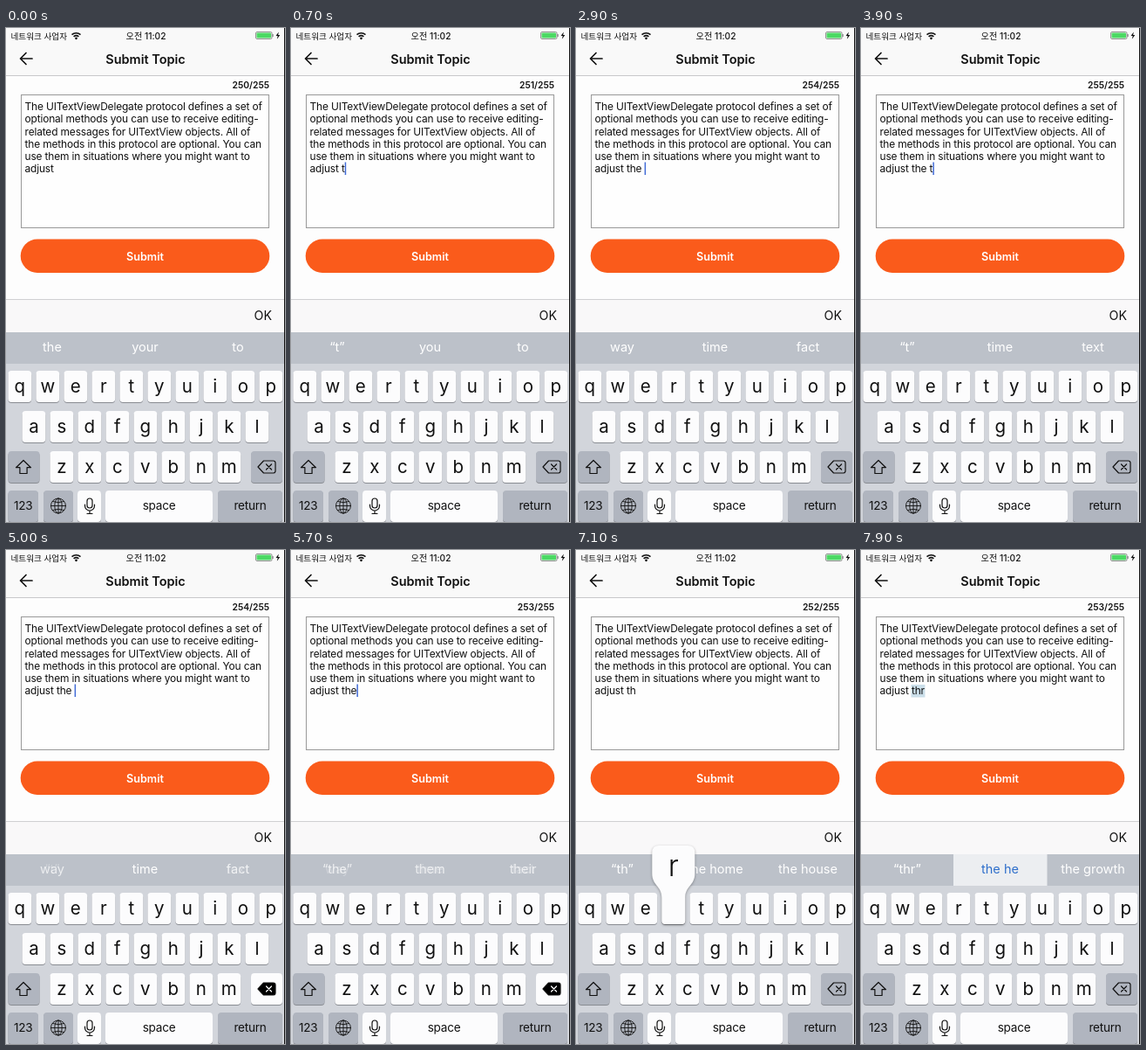
Write an HTML page that moves like this. It is 320 px wide and 565 px high and loops after 8000 ms.

```html
<!DOCTYPE html>
<html lang="ko">
<head>
<meta charset="utf-8">
<style>
  html, body { margin: 0; height: 100%; overflow: hidden; background: #fdfdfd; }
  svg { display: block; width: 100vw; height: 100vh; }
  text { font-family: Inter, "Noto Sans CJK KR", "Noto Sans CJK", sans-serif; fill: #111; white-space: pre; }
  .mid { text-anchor: middle; }
  .end { text-anchor: end; }
  .bold { font-weight: 600; }
  .body { font-size: 11.95px; letter-spacing: -.013em; }
  .key { font-size: 20.5px; }
  .label { font-size: 13.6px; letter-spacing: -.02em; }
  .word { font-size: 14.5px; }
  .line { fill: none; stroke: #111; stroke-width: 1.2; stroke-linejoin: round; stroke-linecap: round; }
</style>
</head>
<body>
<svg id="stage" viewBox="0 0 320 565">
  <path d="M0 0H320V54H0z" fill="#f9f9f9"/>
  <path d="M0 54.5H320" stroke="#c9c9cb"/>
  <text x="5.5" y="12.5" font-size="9.6">네트워크 사업자</text>
  <g fill="none" stroke="#111" stroke-width="1.5">
    <path d="M75.5 7.6a7.4 7.4 0 0 1 10 0M77.6 9.9a4.4 4.4 0 0 1 5.8 0"/>
    <circle cx="80.5" cy="11.8" r=".6"/>
  </g>
  <text class="mid" x="160.5" y="12.5" font-size="10.2" font-weight="500">오전 11:02</text>
  <rect x="286.5" y="4.5" width="18.5" height="8" rx="1.5" fill="none" stroke="#777" stroke-width=".8"/>
  <rect x="287.5" y="5.5" width="16.5" height="6" rx=".8" fill="#4cd964"/>
  <path d="M306 7v3" stroke="#777" stroke-width="1.2"/>
  <path d="M312.8 4.5l-3.3 4.6h2.2l-.9 3.6 3.5-4.7h-2.2z" fill="#111"/>
  <path class="line" style="stroke-width:1.7" d="M30 35H17M23 28.5L16.5 35L23 41.5"/>
  <text class="mid bold" x="160" y="41" font-size="14.5">Submit Topic</text>

  <text class="end bold" id="count" x="302" y="68.7" font-size="10.3"></text>
  <rect x="17.5" y="76.5" width="284" height="152" fill="#fefefe" stroke="#999"/>
  <rect id="mark" y="154" height="14.5" fill="#cbdfea"/>
  <g id="copy"></g>
  <rect id="caret" y="153.5" width="1.5" height="14.5" fill="#416bd6"/>
  <rect x="16.7" y="241.5" width="285.6" height="38.5" rx="19.25" fill="#fa5b1b"/>
  <text class="mid bold" x="159.5" y="265.6" font-size="12.6" style="fill:#fff">Submit</text>

  <path d="M0 310H320V348H0z" fill="#f9f8f9"/>
  <path d="M0 310.5H320" stroke="#d0d0d2"/>
  <text class="end" x="305" y="334.4" font-size="14.2">OK</text>
  <path d="M0 348H320V565H0z" fill="#d2d5db"/>
  <path d="M0 348H320V384H0z" fill="#bcc1c9"/>
  <rect id="pick" x="106" y="348" width="107.5" height="36" fill="#eceef1"/>
  <g id="words"></g>
  <g id="keys"></g>
  <g class="line">
    <path d="M20 494.5l8.5 8.2h-4.4v6.8h-8.2v-6.8h-4.4z"/>
    <g stroke-width=".9">
      <circle cx="60" cy="546.5" r="8.5"/>
      <ellipse cx="60" cy="546.5" rx="4.2" ry="8.5"/>
      <path d="M60 538v17M51.5 546.5h17M53.3 541.5q6.7 2.6 13.4 0M53.3 551.5q6.7-2.6 13.4 0"/>
    </g>
    <rect x="93" y="538" width="6" height="11" rx="3"/>
    <path d="M90.5 545v1.5a5.5 5.5 0 0 0 11 0V545M96 552v3.5M93 555.5h6"/>
    <path id="eraser" d="M289 502l6.5-7h11q2.5 0 2.5 2.5v9q0 2.5-2.5 2.5h-11z"/>
    <path id="cross" d="M298.5 499l6 6M304.5 499l-6 6"/>
  </g>
  <g id="popup">
    <path style="filter:drop-shadow(0 1px 1.5px #0005)" fill="#fcfcfd"
      d="M-24.5-46q0-8 8-8h33q8 0 8 8v24c0 14-11.1 14-11.1 28v26q0 4-4 4h-18.8q-4 0-4-4v-26c0-14-11.1-14-11.1-28z"/>
    <text class="mid" id="bigLetter" y="-19.5" font-size="33.5" font-weight="300"></text>
  </g>
  <path d="M319.5 0V565" stroke="#111"/>
</svg>
<script>
const LOOP = 8000;
const $ = id => document.getElementById(id);

function add(parent, tag, attrs, text = '') {
  const el = document.createElementNS('http://www.w3.org/2000/svg', tag);
  for (const name in attrs) el.setAttribute(name, attrs[name]);
  el.textContent = text;
  return parent.appendChild(el);
}
const set = (el, attrs) => { for (const name in attrs) el.setAttribute(name, attrs[name]); };

const lines = [
  'The UITextViewDelegate protocol defines a set of',
  'optional methods you can use to receive editing-',
  'related messages for UITextView objects. All of',
  'the methods in this protocol are optional. You can',
  'use them in situations where you might want to',
  'adjust '
];
const LEFT = 21.5;
const rows = lines.map((s, i) => add($('copy'), 'text', { class: 'body', x: LEFT, y: 94.2 + 14.2 * i }, s));
const lastLine = rows[5];

// Keyboard
const GREY = '#b0b5bf', WHITE = '#fcfcfd';
const keys = {};
function addKey(name, x, y, width, fill = WHITE, label = '', cls = 'label') {
  add($('keys'), 'rect', { x, y: y + 1, width, height: 36, rx: 4, fill: '#898c92' });
  const cap = add($('keys'), 'rect', { x, y, width, height: 36, rx: 4, fill });
  const dy = cls === 'key' ? 24.8 : 22;
  add($('keys'), 'text', { class: 'mid ' + cls, x: x + width / 2, y: y + dy }, label);
  keys[name] = { cap, x: x + width / 2, y };
}
[['qwertyuiop', 15.8], ['asdfghjkl', 31.9], ['zxcvbnm', 63.8]].forEach(([row, x0], r) =>
  [...row].forEach((c, i) => addKey(c, x0 + 32 * i - 13.4, 392 + 46 * r, 26.8, WHITE, c, 'key')));
addKey('shift', 2.5, 484, 36, GREY);
addKey('delete', 281, 484, 36, GREY);
addKey('123', 2.5, 529, 34.5, GREY, '123');
addKey('globe', 43, 529, 34, GREY);
addKey('mic', 82, 529, 27, WHITE);
addKey('space', 114, 529, 123, WHITE, 'space');
addKey('return', 243, 529, 74, GREY, 'return');

// Each step: time, key pressed, text after "adjust ", suggestions
const steps = [
  [-1000, '', '', ['the', 'your', 'to']],
  [540, 't', 't', ['“t”', 'you', 'to']],
  [1250, 'h', 'th', ['“th”', 'the', 'that']],
  [1900, 'e', 'the', ['“the”', 'them', 'their']],
  [2750, 'space', 'the ', ['way', 'time', 'fact']],
  [3600, 't', 'the t', ['“t”', 'time', 'text']],
  [4900, 'delete', 'the ', ['way', 'time', 'fact']],
  [5600, 'delete', 'the', ['“the”', 'them', 'their']],
  [6300, 'delete', 'th', ['“th”', 'the home', 'the house']],
  [7150, 'r', 'thr', ['“thr”', 'the he', 'the growth']]
];
const slots = [53, 159.5, 266].map(x =>
  [0, 1].map(() => add($('words'), 'text', { class: 'word mid', x, y: 370 })));

function showWord(el, word, opacity, colour) {
  el.textContent = word;
  el.style.fill = colour;
  set(el, { opacity });
}

function draw(t) {
  const index = steps.findLastIndex(s => s[0] <= t);
  const [time, , typed, words] = steps[index];
  const age = t - time;
  const before = steps[Math.max(0, index - 1)][3];
  const fade = Math.min(1, Math.max(0, (age - 20) / 110));
  const picking = typed === 'thr';

  lastLine.textContent = lines[5] + typed;
  $('count').textContent = 250 + typed.length + '/255';
  const end = LEFT + lastLine.getComputedTextLength();
  const start = LEFT + lastLine.getSubStringLength(0, lines[5].length);
  const marked = picking && fade > 0;
  set($('mark'), { x: start - .5, width: end - start + 1, opacity: marked ? fade : 0 });
  const caretOn = index ? age < 700 || (age - 700) % 1000 >= 400 : t >= 350;
  set($('caret'), { x: end, opacity: caretOn && !marked ? 1 : 0 });

  set($('pick'), { opacity: picking ? fade : 0 });
  slots.forEach(([old, now], i) => {
    const same = before[i] === words[i];
    showWord(old, before[i], same ? 0 : 1 - fade, '#fff');
    showWord(now, words[i], same ? 1 : fade, picking && i === 1 ? '#2f6fcb' : '#fff');
  });

  const press = steps.find(s => t >= s[0] - 80 && t < s[0] + 150);
  const down = press ? press[1] : '';
  const letter = down.length === 1;
  set($('popup'), { visibility: letter ? 'visible' : 'hidden' });
  if (letter) {
    set($('popup'), { transform: `translate(${keys[down].x} ${keys[down].y})` });
    $('bigLetter').textContent = down;
  }
  const erasing = down === 'delete';
  set(keys.space.cap, { fill: down === 'space' ? GREY : WHITE });
  set(keys.delete.cap, { fill: erasing ? WHITE : GREY });
  $('eraser').style.fill = erasing ? '#000' : 'none';
  $('cross').style.stroke = erasing ? '#fff' : '#111';
}

const origin = performance.now();
function tick() {
  draw((performance.now() - origin) % LOOP);
  requestAnimationFrame(tick);
}
tick();
</script>
</body>
</html>
```
